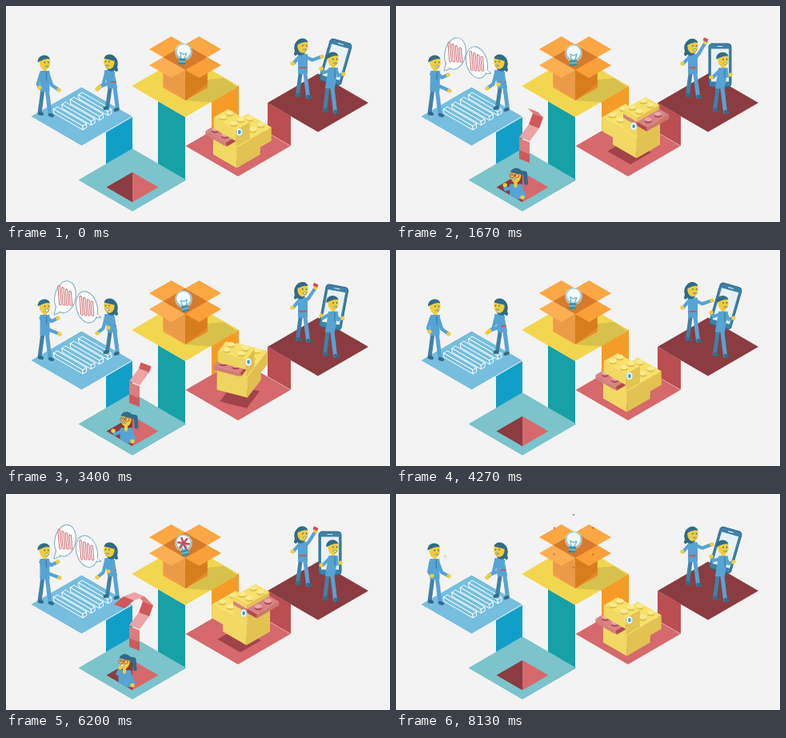
Animation, 480 px wide and 270 px high, one loop 8.19 s. Source, as an HTML page with a canvas:

```html
<!DOCTYPE html>
<html lang="en">
<head>
<meta charset="utf-8">
<title>Isometric teamwork</title>
<style>
html, body { margin: 0; width: 100%; height: 100%; overflow: hidden; background: #f3f3f3; }
canvas { display: block; width: 480px; height: 270px; }
</style>
</head>
<body>
<canvas id="stage" width="480" height="270"></canvas>
<script>
const ctx = document.getElementById('stage').getContext('2d');
const LOOP = 8190, HALF = LOOP / 2, STEPS = 123, SLOPE = 0.58;
const SKIN = '#f0cd3e', HAIR = '#326b88', SUIT = '#57a3d3', SUIT_DARK = '#3f81a6';
const RED = '#d5696b', DARK_RED = '#8a3c40', YELLOW = '#f7e16a', BLUE = '#76bedd';
const { sin, cos, PI } = Math;

const clamp = x => Math.min(1, Math.max(0, x));
const lin = (p, a, b) => clamp((p - a) / (b - a));
const ease = (p, a, b) => { const x = lin(p, a, b); return x * x * (3 - 2 * x); };
const hold = (p, a, b, c, d) => ease(p, a, b) - ease(p, c, d);
const mix = (a, b, k) => a.map((v, i) => v + (b[i] - v) * k);

function trace(pts, closed = true) {
  ctx.beginPath();
  for (const [x, y] of pts) ctx.lineTo(x, y);
  if (closed) ctx.closePath();
}
function paint(fill, edge, width = 1) {
  if (fill) { ctx.fillStyle = fill; ctx.fill(); }
  if (edge) { ctx.strokeStyle = edge; ctx.lineWidth = width; ctx.stroke(); }
}
function poly(pts, ...style) { trace(pts); paint(...style); }
function oval(x, y, rx, ry, ...style) {
  ctx.beginPath();
  ctx.ellipse(x, y, rx, ry, 0, 0, 2 * PI);
  paint(...style);
}
function line(pts, width, color) {
  trace(pts, false);
  ctx.lineCap = ctx.lineJoin = 'round';
  paint(null, color, width);
}
function rect(w, h, round, ...style) {
  ctx.beginPath();
  ctx.roundRect(-w / 2, -h / 2, w, h, round);
  paint(...style);
}
function at(x, y, scale, turn, draw) {
  ctx.save();
  ctx.translate(x, y);
  ctx.rotate(turn);
  ctx.scale(scale, scale);
  draw();
  ctx.restore();
}

const diamond = (x, y, w, h = w * SLOPE) => [[x - w, y], [x, y - h], [x + w, y], [x, y + h]];
const tile = (x, y, w, color) => poly(diamond(x, y, w), color);
function wall(x, y, w, dir, drop, color) {
  const end = y + dir * w * SLOPE;
  poly([[x, y], [x + w, end], [x + w, end + drop], [x, y + drop]], color);
}

// Isometric frame: u points forward, v sideways, z up; turn 0 faces lower left.
function isoFrame(x, y, turn) {
  const s = sin(turn), c = cos(turn);
  const point = (u, v, z) => {
    const a = u * s + v * c, b = u * c - v * s;
    return [x + (a - b) * 0.866, y + (a + b) * 0.5 - z];
  };
  const flat = (u0, u1, v, z) => [point(u0, -v, z), point(u1, -v, z), point(u1, v, z), point(u0, v, z)];
  function prism(u0, u1, v, z0, z1, color, edge) {
    const low = flat(u0, u1, v, z0), top = flat(u0, u1, v, z1);
    const normals = [[-c, s], [s, c], [c, -s], [-s, -c]];
    normals.forEach(([na, nb], i) => {
      if (na + nb < 0.001) return;
      const j = (i + 1) % 4, face = [low[i], low[j], top[j], top[i]];
      poly(face, color, edge);
      if (!edge) poly(face, `rgba(150,85,0,${0.06 + 0.08 * (na - nb + 1)})`);
    });
    poly(top, color, edge);
  }
  function studs(us, v, z, top, side) {
    for (const u of us) for (const d of [-v, v]) {
      const [px, py] = point(u, d, z);
      oval(px, py, 4.6, 2.7, side);
      oval(px, py - 2, 4.6, 2.7, top);
    }
  }
  return { point, flat, prism, studs };
}

function ground() {
  wall(125, 158, 33, -1, 40, '#129fc7');
  wall(190, 119, 34, 1, 79, '#17a0a6');
  wall(257, 119, 34, -1, 37, '#f59c28');
  wall(327, 121, 29, 1, 37, '#bb4e51');
  tile(94.5, 138, 63, BLUE);
  tile(158, 217.5, 67.5, '#7cc3cb');
  tile(224, 100, 67, '#f2d64f');
  tile(290, 175, 65.5, RED);
  tile(390, 121, 63, DARK_RED);
  const [left, top, right, bottom] = diamond(158, 226.5, 32.5);
  poly([left, top, bottom], DARK_RED);
  poly([right, top, bottom], RED);
}

function bars() {
  for (let i = 0; i < 4; i++) {
    const d = 27 - i * 12;
    isoFrame(94 + d * 0.866, 142 - d * 0.5, PI / 2).prism(-28, 14, 2.7, 0, 5, BLUE, '#fff');
  }
}

function head(x, y, look, long, talk = 0) {
  const r = 7.8;
  if (long) {
    oval(x - look * 3, y + 2, r, r + 2, HAIR);
    line([[x - look * 7, y + 3], [x - look * 9, y + 10]], 4, HAIR);
  }
  oval(x, y, r * 0.86, r * 1.12, SKIN);
  ctx.beginPath();
  ctx.ellipse(x - look, y - 2.5, r, r * 0.9, look * -0.25, PI, 2 * PI);
  ctx.quadraticCurveTo(x + look * 2, y - r * 0.8, x - look * r, y - 1);
  paint(HAIR);
  for (const dx of [0, 4.5]) oval(x + look * dx, y - 0.5, 0.8, 1.1, HAIR);
  oval(x + look * 2.5, y + 4.5, 2.1, 0.6 + talk, '#fff', HAIR, 0.6);
}

function arm(from, hand, bend) {
  const [ex, ey] = mix(from, hand, 0.5);
  line([from, [ex + bend, ey + 4], hand], 4.2, SUIT);
  oval(...hand, 2.7, 2.5, SKIN);
}

// Stands at x, y; hands are [far, near].
function person({ x, y, tall = 64, lean = 0, look = 1, long, talk, hands }) {
  const hip = y - tall * 0.5, fx = x + lean, fy = y - tall, chest = fy + 14;
  for (const side of [-1, 1]) {
    const foot = [x + side * 6.5, y + side];
    line([[x + side * 2.5, hip], [x + side * 4.5, (hip + y) / 2], foot], 5, side < 0 ? SUIT_DARK : SUIT);
    line([foot, [foot[0] + look * 3, y + side + 1]], 4, HAIR);
  }
  arm([fx + look * 4, chest], hands[0], -look * 2);
  line([[fx, fy + 6], [fx, chest]], 4.5, SKIN);
  poly([[fx - 5, chest - 3], [fx + 5, chest - 3], [x + 5, hip + 3], [x - 5, hip + 3]], SUIT, SUIT, 2);
  if (long) line([[x - 4, hip - 4], [x + 4, hip - 4]], 1.8, '#c95459');
  else line([[fx + look * 2, chest - 2], [fx + look * 2, chest + 8]], 1.4, SUIT_DARK);
  head(fx, fy, look, long, talk);
  arm([fx - look * 5, chest], hands[1], -look * 3);
}

function bubble(x, y, scale, tilt, tail) {
  if (scale < 0.03) return;
  const rx = 13, ry = 20, dir = Math.sign(tail[0] - x);
  at(...mix(tail, [x, y], scale), scale, 0, () => {
    const tip = [tail[0] - x, tail[1] - y];
    const root = [[-3 * dir, ry - 4], tip, [rx * 0.8 * dir, ry * 0.4]];
    poly(root, '#fff', '#76a9c4');
    at(0, 0, 1, tilt, () => oval(0, 0, rx, ry, '#fff', '#76a9c4'));
    poly(root.map(p => mix(p, [0, 0], 0.12)), '#fff');
    for (let i = -1.5; i < 2; i++) at(i * 4.6, i * 1.2, 1, -0.08, () => rect(2.4, 21 - i * 2, 0.5, '#fff', '#cc5b60', 0.9));
  });
}

function talkers(p) {
  const first = hold(p, 350, 720, 3800, 4090), second = hold(p, 1000, 1320, 3550, 3850);
  const sway = sin(p / HALF * 6 * PI);
  person({
    x: 48.5, y: 135, lean: sway * 0.6, talk: first * (0.7 + 0.7 * sin(p / 75)),
    hands: [mix([66, 105], [65, 85 + sway], first), mix([42, 102], [67, 105 + sway], first)]
  });
  person({
    x: 133, y: 128, tall: 58, lean: -4, look: -1, long: true, talk: second * (0.7 + 0.7 * cos(p / 75)),
    hands: [[114, 104 - sway], mix([117, 101], [128, 97 + sway], second)]
  });
  bubble(74, 58.5 + sway, first, 0.2, [60, 81]);
  bubble(101, 71.5 - sway, second, -0.25, [119, 84]);
}

// A ribbon swept along one edge, growing fold by fold.
function question(p) {
  const path = [[154, 191], [154, 180], [154, 164], [166, 148], [171, 134], [160, 123], [147, 128], [135, 138]];
  const grown = ease(p, 600, 900) + 6 * lin(p, 1100, 2050) - 7 * lin(p, 2950, 3850);
  for (let i = 0; i < 7; i++) {
    const k = clamp(grown - i);
    if (!k) continue;
    const from = path[i], to = mix(from, path[i + 1], i === 1 ? k * 0.92 : k);
    const side = ([x, y]) => [x + 13, y + 5];
    poly([from, to, side(to), side(from)], `hsl(359 ${56 + i % 3 * 4}% ${58 + i % 3 * 10}%)`);
  }
}

function climber(p) {
  const up = hold(p, 100, 750, 3500, 4090), think = hold(p, 1500, 2000, 2700, 3200);
  if (up < 0.01) return;
  const [left, , right, bottom] = diamond(158, 226.5, 32.5);
  ctx.save();
  trace([left, bottom, right, [right[0], 150], [left[0], 150]]);
  ctx.clip();
  ctx.translate(0, (1 - up) * 46);
  const x = 150 - think * 2, y = 212 - think * 2 + sin(p / 210) * 0.6;
  line([[x + 6, y - 4], [x + 12, y - 3], [x + 13, y + 9]], 5, HAIR);
  poly([[x - 6, y + 12], [x + 7, y + 12], [x + 9, 240], [x - 6, 240]], SUIT, SUIT, 3);
  line([[x, y + 6], [x, y + 13]], 4, SKIN);
  head(x, y, -1, false, think);
  for (const dx of [-4.5, 1.5]) oval(x + dx, y, 2.8, 2.6, null, '#b44b50', 0.9);
  arm([x - 6, y + 15], mix([134, 226], [143, 217], think), -3);
  arm([x + 7, y + 16], [158, 239], 3);
  ctx.restore();
}

function bulb(x, y, tilt, star) {
  at(x, y, 1, tilt, () => {
    oval(0, 0, 11, 11, 'rgba(190,234,247,.55)');
    oval(0, -1, 9, 9, '#f2fbfe', '#8fd3e8');
    line([[-2, 9], [-4, 1], [0, 3], [4, 1], [2, 9]], 1, '#45adcf');
    line([[-5, -4], [-2, -7]], 1.6, '#fff');
    for (let i = 0; i < 3; i++) {
      line([[-3.5, 10 + i * 2.5], [3.5, 9.3 + i * 2.5]], 2.2, i === 1 ? '#5cb9d8' : '#258eb5');
      if (star > 0) at(0, 0, star, i * PI / 3 + 0.3, () => line([[-7, 0], [7, 0]], 2.6, '#c94f56'));
    }
  });
}

function box(p) {
  const T = HALF / 3, q = p % T, wave = cos(2 * PI * q / T);
  const size = 16, height = 38;
  const flap = (side, color) => {
    const { point } = isoFrame(224, 102, side * PI / 2);
    poly([point(size, -size, height), point(size, size, height), point(36, size, height), point(36, -size, height)], color);
  };
  const { point, prism } = isoFrame(224, 102, 0);
  poly([point(16, 16, 0), point(-16, 16, 10), point(-40, 16, 0), point(-38, 37, 0), point(0, 37, 0)], '#d8c04c');
  prism(-size, size, size, 0, height, '#f5a350');
  poly([point(size, size, 0), point(-size, size, 0), point(-size, size, height), point(size, size, height)], '#e88a25');
  tile(224, 64, 28, '#d67a2b');
  flap(3, '#fba743');
  flap(2, '#fba743');
  const x = 222, y = 59.5 - 2 * wave;
  bulb(x, y, 0.16 * wave, hold(q, 685, 735, 820, 900));
  ctx.save();
  trace([point(size, -size, height), point(size, size, height), point(-size, size, height), point(-size, size, 5), point(size, size, 0), point(size, -size, 5)]);
  ctx.clip();
  prism(-size, size, size, 0, height - 0.01, 'transparent');
  ctx.restore();
  flap(0, '#fcae52');
  flap(1, '#f9a039');
  const fly = lin(q, 810, 1340);
  if (fly === 0 || fly === 1) return;
  const reach = 22 + 11 * (1 - (1 - fly) ** 2);
  for (let i = 0; i < 6; i++) {
    const a = -PI / 2 + i * PI / 3;
    at(x + reach * 0.85 * cos(a), 59 + reach * sin(a), 1 - 0.6 * fly, a + fly, () => rect(5.5, 3, 0, '#cb535a'));
  }
}

function duck(p) {
  const turned = hold(p, 700, 1250, 2950, 3600), turn = turned * PI / 2;
  const jump = 28 * sin(PI * lin(p, 700, 1250)) + 17 * sin(PI * lin(p, 2950, 3600));
  const x = 291 + 7 * turned, y = 184 - 4 * turned;
  const lift = turned * (9 + sin(p / 160)) + jump;
  poly(isoFrame(x - 5 * turned, y + 3 * turned, turn).flat(-18, 15, 15, 0), '#a1434a');
  const { prism, studs, point } = isoFrame(x, y - lift, turn);
  const top = '#faeb92', side = '#dfbf45', bill = 33 + 7 * turned;
  prism(-14, 20, 17, 0, 10, YELLOW);
  prism(-30, 20, 17, 9, 26, YELLOW);
  studs([-24, -12], 8, 26, top, side);
  prism(0, 20, 16, 26, bill, YELLOW);
  prism(18 - 18 * turned, 34, 14 + 2 * turned, bill, bill + 5, '#d98285');
  for (const [u, v] of [[20, -16], [20, 16]]) {
    const edge = [point(u, v, bill), point(34, v, bill), point(34, v, bill + 5), point(u, v, bill + 5)];
    if (turn > PI / 4 === v < 0) poly(edge, '#b4484e');
  }
  studs([27], 7, bill + 5, '#e8a5a4', '#a9494f');
  prism(0, 20, 16, turned > 0.5 ? bill + 5 : bill, 47 + 3 * turned, YELLOW);
  studs([5, 15], 8, 47 + 3 * turned, top, side);
  const eye = point(15, turn < PI / 4 ? 16 : -16, 42 - 5 * turned);
  oval(...eye, 3.5, 4.6, '#fff', '#b8dcec', 0.8);
  oval(...eye, 1.8, 2.7, '#3e9cc8');
}

function photographers(p) {
  const upright = hold(p, 350, 1050, 2850, 3750), reach = hold(p, 500, 1150, 3500, 4050);
  const wave = sin(p / HALF * 8 * PI);
  const hand = mix([395, 63], [387, 46 + wave], reach);
  person({ x: 371, y: 112, tall: 62 + wave * 0.5, long: true, talk: reach * 0.6, hands: [hand, [358, 72]] });
  at(hand[0], hand[1] - 3, reach, 0.4, () => rect(6, 4, 0, '#c9545a'));
  at(...mix([412, 70], [405, 74], upright), 1, 0.28 * (1 - upright), () => {
    rect(28, 54, 4, SUIT_DARK, '#2f6687');
    rect(22, 41, 0, '#e8f2f6');
    line([[-3, -23.5], [3, -23.5]], 1.2, '#d4e9f2');
    oval(0, 23.5, 2, 2, '#d4e9f2');
  });
  person({
    x: 405, y: 131, tall: 64 + wave * 0.4, lean: 4, talk: upright * 0.6,
    hands: [mix([422, 85], [418, 86], upright), mix([394, 78], [394, 89], upright)]
  });
}

function draw(now) {
  const step = Math.floor((now % LOOP) / LOOP * STEPS + 0.02);
  const p = (step * LOOP / STEPS) % HALF;
  ctx.fillStyle = '#f3f3f3';
  ctx.fillRect(0, 0, 480, 270);
  ground();
  bars();
  for (const part of [talkers, box, duck, photographers, question, climber]) part(p);
}

const start = performance.now();
function tick() {
  draw(performance.now() - start);
  requestAnimationFrame(tick);
}
tick();
</script>
</body>
</html>
```
